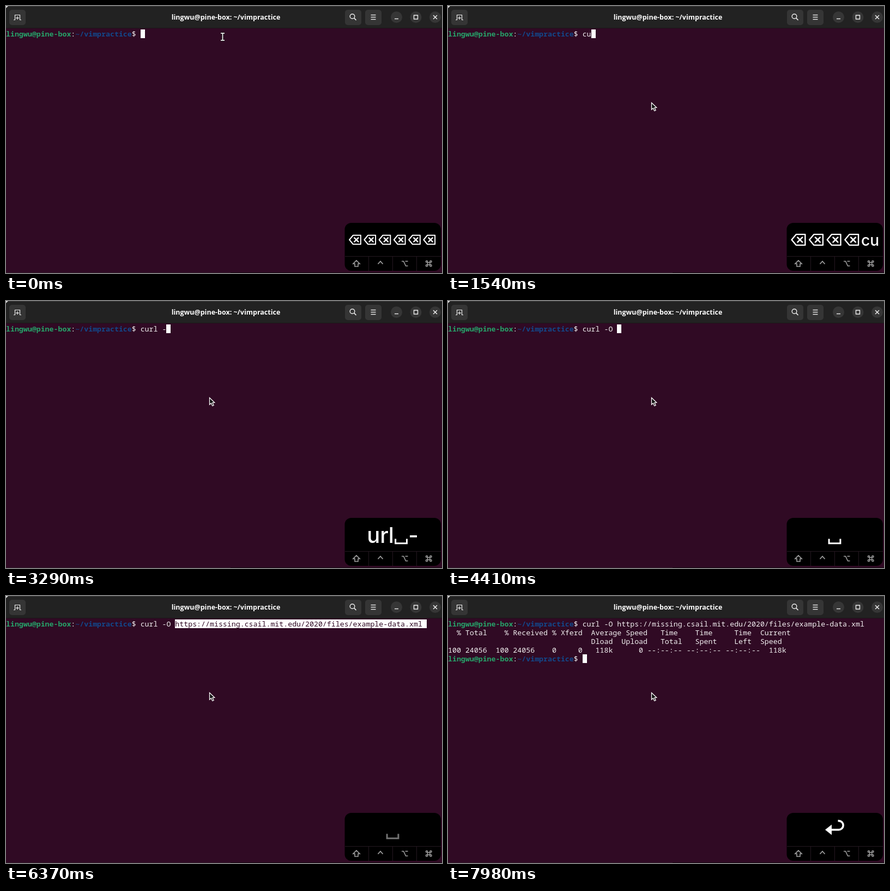
An HTML page with a canvas for the animation above (8 s loop, 800x490 px).

```html
<!DOCTYPE html>
<html lang="en">
<head>
<meta charset="utf-8">
<title>Terminal</title>
<style>
html, body { margin: 0; width: 800px; height: 490px; overflow: hidden; background: #300a24; }
canvas { display: block; }
</style>
</head>
<body>
<canvas id="stage" width="800" height="490"></canvas>
<script>
const g = document.getElementById('stage').getContext('2d');
const LOOP = 8000, BLINK = 630;
const CELL = 7.957, ROW = 15.95, TOP = 43;
const USER = 'lingwu@pine-box', DIR = '~/vimpractice';
const START = USER.length + DIR.length + 3;
const URL_TEXT = 'https://missing.csail.mit.edu/2020/files/example-data.xml';
const BG = '#300a24', FG = '#f2f0f1';
const MONO = '"Noto Sans Mono", "DejaVu Sans Mono", monospace';
const KEYS = [[1260, 'c'], [1540, 'u'], [1890, 'r'], [2170, 'l'], [2450, ' '], [3220, '-'], [3850, 'O'], [4400, ' ']];
const PASTE = 6090, ENTER = 7300, HEADER = 7420, DONE = 7700;
const TABLE = [
  '  % Total    % Received % Xferd  Average Speed   Time    Time     Time  Current',
  '                                 Dload  Upload   Total   Spent    Left  Speed'
];
const IDLE = '  0     0    0     0    0     0      0      0 --:--:-- --:--:-- --:--:--     0';
const RESULT = '100 24056  100 24056    0     0   118k      0 --:--:-- --:--:-- --:--:--  118k';

function rect(x, y, w, h, color, r = 0) {
  g.fillStyle = color;
  g.beginPath();
  g.roundRect(x, y, w, h, r);
  g.fill();
}

function disc(x, y, r, color) {
  g.fillStyle = color;
  g.beginPath();
  g.arc(x, y, r, 0, 7);
  g.fill();
}

function trace(points, close) {
  g.beginPath();
  for (let i = 0; i < points.length; i += 2) g.lineTo(points[i], points[i + 1]);
  if (close) g.closePath();
}

function line(points, color, width, close) {
  g.strokeStyle = color;
  g.lineWidth = width;
  trace(points, close);
  g.stroke();
}

function polygon(points, color) {
  g.fillStyle = color;
  trace(points, true);
  g.fill();
}

// Terminal grid
function put(text, col, row, color = FG, weight = 400) {
  g.font = `${weight} 13.26px ${MONO}`;
  g.textAlign = 'left';
  g.fillStyle = color;
  [...text].forEach((c, i) => {
    if (c !== ' ') g.fillText(c, (col + i) * CELL, TOP + 12.7 + row * ROW);
  });
}

function block(col, row, n = 1) {
  const x = Math.round(col * CELL);
  rect(x, Math.round(TOP + row * ROW), Math.round(n * CELL), 16, '#fff');
}

function prompt(row) {
  put(USER, 0, row, '#26a269', 700);
  put(':', USER.length, row);
  put(DIR, USER.length + 1, row, '#12488b', 700);
  put('$', START - 2, row);
}

function blinkOn(t) {
  let last = -210;
  for (const at of [...KEYS.map(k => k[0]), PASTE, ENTER, DONE]) if (t >= at) last = at;
  return Math.floor((t - last) / BLINK) % 2 === 0;
}

function terminal(t) {
  const typed = KEYS.filter(k => t >= k[0]).map(k => k[1]).join('');
  let col = START + typed.length, row = 0;
  prompt(0);
  put(typed, START, 0);
  if (t >= PASTE) {
    const marked = t < ENTER;
    if (marked) block(col, 0, URL_TEXT.length);
    put(URL_TEXT, col, 0, marked ? BG : FG);
    col += URL_TEXT.length;
  }
  if (t >= ENTER) { col = 0; row = 1; }
  if (t >= HEADER) {
    TABLE.forEach((s, i) => put(s, 0, i + 1));
    put(t >= DONE ? RESULT : IDLE, 0, 3);
    col = IDLE.length;
    row = 3;
  }
  if (t >= DONE) {
    prompt(4);
    col = START;
    row = 4;
  }
  if (blinkOn(t)) block(col, row);
}

function titleBar() {
  rect(0, 0, 800, 41, '#222');
  rect(0, 0, 800, 1, '#3c3c3c');
  rect(0, 40, 800, 1, '#1b1819');
  polygon([0, 0, 4, 0, 0, 4], '#ddd');
  for (const x of [6, 622, 659]) rect(x, 7, 30, 28, '#353535', 5);
  for (const x of [716.5, 752, 787.5]) disc(x, 20.5, 10.5, '#363636');
  g.font = '700 12.5px "Open Sans", "Noto Sans", sans-serif';
  g.textAlign = 'center';
  g.fillStyle = '#fff';
  g.fillText(`${USER}: ${DIR}`, 403.5, 25);
  const ink = '#eee';
  line([14, 25.5, 16.5, 25.5, 16.5, 16.5, 25.5, 16.5, 25.5, 25.5, 28, 25.5], ink, 1.2);
  line([21, 19, 21, 25], ink, 1.2);
  line([18, 22, 24, 22], ink, 1.2);
  g.lineWidth = 1.4;
  g.beginPath();
  g.arc(635.5, 19, 4.3, 0, 7);
  g.stroke();
  line([638.7, 22.2, 642.5, 26], ink, 1.7);
  for (const y of [16.5, 20.5, 24.5]) line([669.5, y, 678.5, y], ink, 1.4);
  line([713, 23.5, 720, 23.5], ink, 1.4);
  line([748.5, 17, 755.5, 17, 755.5, 24, 748.5, 24], ink, 1.4, true);
  line([784, 17, 791, 24], ink, 1.5);
  line([791, 17, 784, 24], ink, 1.5);
}

// I-beam while moving, arrow at rest
function pointer(t) {
  const ramp = (a, b) => Math.min(1, Math.max(0, (t - a) / (b - a)));
  const p = 0.3 * ramp(70, 280) + 0.7 * ramp(420, 770);
  g.save();
  if (p < 1) {
    g.translate(397.5 - 20 * p, 56.5 + 122 * p);
    for (const [color, w] of [['#111', 3.4], ['#fff', 1.6]]) {
      line([-3.5, -6.5, 3.5, -6.5], color, w);
      line([-3.5, 6.5, 3.5, 6.5], color, w);
      line([0, -6.5, 0, 6.5], color, w);
    }
  } else {
    g.translate(373.5, 177.5);
    const arrow = [0, 0, 0, 12.5, 3, 10, 5.3, 15, 7.6, 14, 5.4, 9.2, 9.2, 9];
    polygon(arrow, '#0b0b0b');
    line(arrow, '#fff', 1.3, true);
  }
  g.restore();
}

// Key display: the newest six units, a space counts as two
function shownKeys(t) {
  if (t >= ENTER) return 'R';
  if (t >= 4400) return ' ';
  if (t >= 3850) return t < 4200 ? 'O' : '';
  let s = 'BBBBBB';
  const units = () => s.length + s.split(' ').length - 1;
  for (const [at, key] of KEYS) {
    if (t < at) break;
    s += key;
    while (units() > 6) s = s.slice(1);
  }
  return s;
}

function eraseIcon(x, y, s) {
  const l = x + 0.1 * s, r = x + 0.98 * s, h = 0.35 * s, n = x + 0.39 * s;
  const w = 0.085 * s;
  g.lineJoin = 'round';
  g.lineCap = 'round';
  line([l, y, n, y - h, r, y - h, r, y + h, n, y + h], '#fff', w, true);
  const cx = x + 0.64 * s, d = 0.155 * s;
  line([cx - d, y - d, cx + d, y + d], '#fff', w * 1.15);
  line([cx + d, y - d, cx - d, y + d], '#fff', w * 1.15);
}

function returnIcon() {
  g.strokeStyle = '#fff';
  g.lineWidth = 3.6;
  g.beginPath();
  g.moveTo(700, 429);
  g.lineTo(717, 429);
  g.arc(717, 420.8, 8.2, Math.PI / 2, -Math.PI / 2, true);
  g.lineTo(715.5, 412.6);
  g.stroke();
  polygon([692, 429, 704, 419.5, 704, 438.5], '#fff');
}

function keyText(keys) {
  if (keys === 'R') return returnIcon();
  const face = s => `500 ${s}px Inter, "Open Sans", sans-serif`;
  g.font = face(100);
  const widths = [...keys].map(c => c === 'B' ? 1.157 : c === ' ' ? 0.66 : g.measureText(c).width / 100);
  const total = widths.reduce((a, b) => a + b, 0);
  const size = Math.min(40, 163.5 / total), base = 429.7 + 0.35 * size;
  let x = 709.5 - total * size / 2;
  g.font = face(size);
  g.textAlign = 'left';
  [...keys].forEach((c, i) => {
    const w = widths[i] * size;
    g.save();
    if (c === 'B') {
      eraseIcon(x, 429, size);
    } else if (c === ' ') {
      const l = x + 0.07 * size, r = x + w - 0.07 * size;
      const top = base - 0.18 * size, low = base + 0.025 * size;
      line([l, top, l, low, r, low, r, top], '#fff', 0.075 * size);
    } else {
      g.fillStyle = '#fff';
      g.fillText(c, x, base);
    }
    g.restore();
    x += w;
  });
}

function modifiers(t) {
  const dim = '#a0a0a0';
  const shift = t >= 3700 && t < 4200 ? '#fff' : dim;
  line([643, 467, 649, 473, 646, 473, 646, 478, 640, 478, 640, 473, 637, 473], shift, 1.6, true);
  line([682.5, 473.5, 687, 468.5, 691.5, 473.5], dim, 1.8);
  line([726, 468.5, 729.5, 468.5, 733.5, 477, 737.5, 477], dim, 1.6);
  line([732.5, 468.5, 737.5, 468.5], dim, 1.6);
  g.lineWidth = 1.5;
  g.strokeRect(773.6, 470.6, 4.2, 4.2);
  for (const sx of [-1, 1]) for (const sy of [-1, 1]) {
    g.beginPath();
    g.arc(775.7 + sx * 3.7, 472.7 + sy * 3.7, 1.6, 0, 7);
    g.stroke();
  }
}

function keyPanel(t) {
  rect(621.5, 398, 176.5, 88, '#000', 12);
  rect(622, 459, 176, 1, '#241820');
  for (const x of [665, 709, 753]) rect(x, 460, 1, 26, '#241820');
  modifiers(t);
  g.save();
  if (t >= 6230 && t < ENTER) g.globalAlpha = Math.max(0, 1 - (t - 6200) / 310);
  keyText(shownKeys(t));
  g.restore();
}

function draw(now) {
  const t = now % LOOP;
  rect(0, 0, 800, 490, BG);
  titleBar();
  terminal(t);
  rect(0, 489, 412, 1, '#2c1a27');
  rect(412, 489, 388, 1, '#120a10');
  keyPanel(t);
  pointer(t);
  requestAnimationFrame(draw);
}
draw(0);
</script>
</body>
</html>
```
